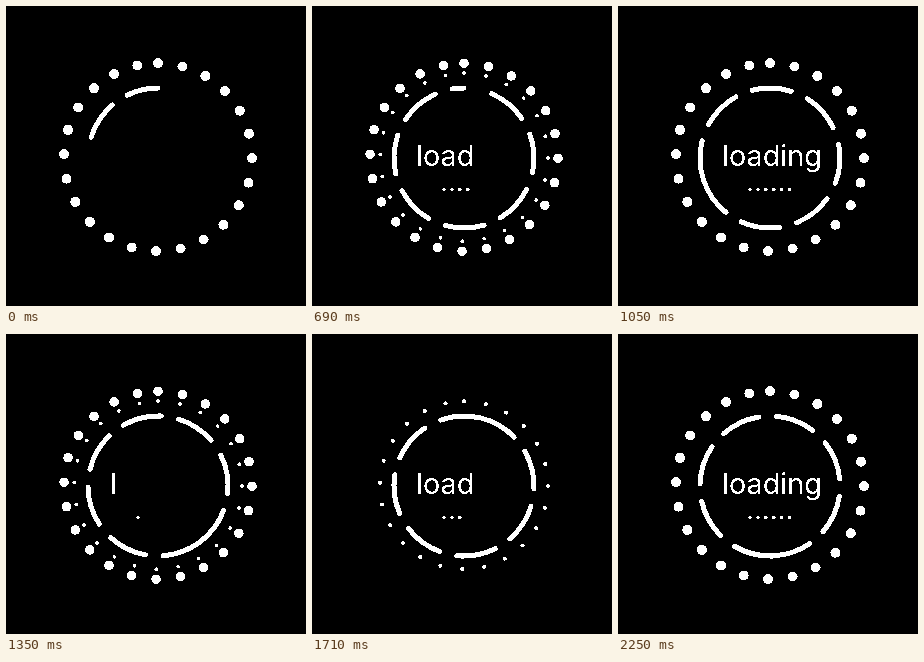
An HTML page for the animation above (2.28 s loop, 300 by 300 pixels).

```html
<!DOCTYPE html>
<html lang="en">
<head>
<meta charset="utf-8">
<title>Loading</title>
<style>
html, body { margin: 0; width: 100%; height: 100%; overflow: hidden; background: #000; }
svg { display: block; width: 100vw; height: 100vh; }
text { font: 400 28.8px Inter, sans-serif; }
</style>
</head>
<body>
<svg viewBox="0 0 300 300">
  <!-- Two-tone look: every pixel is either white or clear. -->
  <filter id="hard" filterUnits="userSpaceOnUse" x="0" y="0" width="300" height="300" color-interpolation-filters="sRGB">
    <feComponentTransfer><feFuncA type="discrete" tableValues="0 1"/></feComponentTransfer>
  </filter>
  <g fill="#fff" filter="url(#hard)">
    <g id="outer"></g>
    <g id="inner"></g>
    <path id="ring" fill="none" stroke="#fff" stroke-width="5" stroke-linecap="round"/>
    <text id="word" x="104" y="160"></text>
    <g id="row"></g>
  </g>
</svg>
<script>
const LOOP = 2280, HALF = LOOP / 2;
const $ = id => document.getElementById(id);
const add = (parent, tag, attrs = {}) => {
  const el = document.createElementNS('http://www.w3.org/2000/svg', tag);
  for (const k in attrs) el.setAttribute(k, attrs[k]);
  return parent.appendChild(el);
};
const clamp = v => Math.min(1, Math.max(0, v));

// Angles are in degrees, clockwise from the top.
const polar = (cx, cy, r, deg) => {
  const a = deg * Math.PI / 180;
  return [cx + r * Math.sin(a), cy - r * Math.cos(a)];
};

function dotRing(group, radius, size) {
  for (let i = 0; i < 24; i++) {
    const [cx, cy] = polar(152, 151.2, radius, i * 15.1);
    add(group, 'circle', { cx, cy, r: size });
  }
}
dotRing($('outer'), 94, 5);
dotRing($('inner'), 84, 2.1);

const letters = [...'loading'].map(c => {
  const span = add($('word'), 'tspan');
  span.textContent = c;
  return span;
});
const row = Array.from({ length: 6 }, (_, i) =>
  add($('row'), 'circle', { cx: 132 + i * 7.9, cy: 183.5, r: 1.8 }));

const DASH = 32.2, STEP = 46.7, CLOSED = 751;

// The ring grows backwards from the top until it closes, then spins.
function ringPath(t) {
  const start = t < CLOSED ? -72.8 - 0.3825 * t : -360 - 0.3613 * (t - CLOSED);
  const end = start + Math.min(360, -start);
  let d = '';
  for (let a = start; a < end; a += STEP) {
    const p = polar(152, 152, 70, a), q = polar(152, 152, 70, Math.min(a + DASH, end));
    d += `M${p}A70 70 0 0 1 ${q}`;
  }
  return d;
}

function draw(t) {
  const u = t % HALF;
  $('ring').setAttribute('d', ringPath(t));

  const away = Math.abs(u - 450);
  $('outer').setAttribute('opacity', clamp(away / 360));
  $('inner').setAttribute('opacity', clamp((400 - away) / 250));

  letters.forEach((el, i) => el.setAttribute('fill-opacity', u / 158 > i + 0.5 ? 1 : 0));
  row.forEach((el, i) => el.setAttribute('opacity', u / 190 > i + 0.32 ? 1 : 0));
}

let origin;
function tick(now) {
  origin ??= now;
  draw((now - origin) % LOOP);
  requestAnimationFrame(tick);
}
draw(0);
requestAnimationFrame(tick);
</script>
</body>
</html>
```
